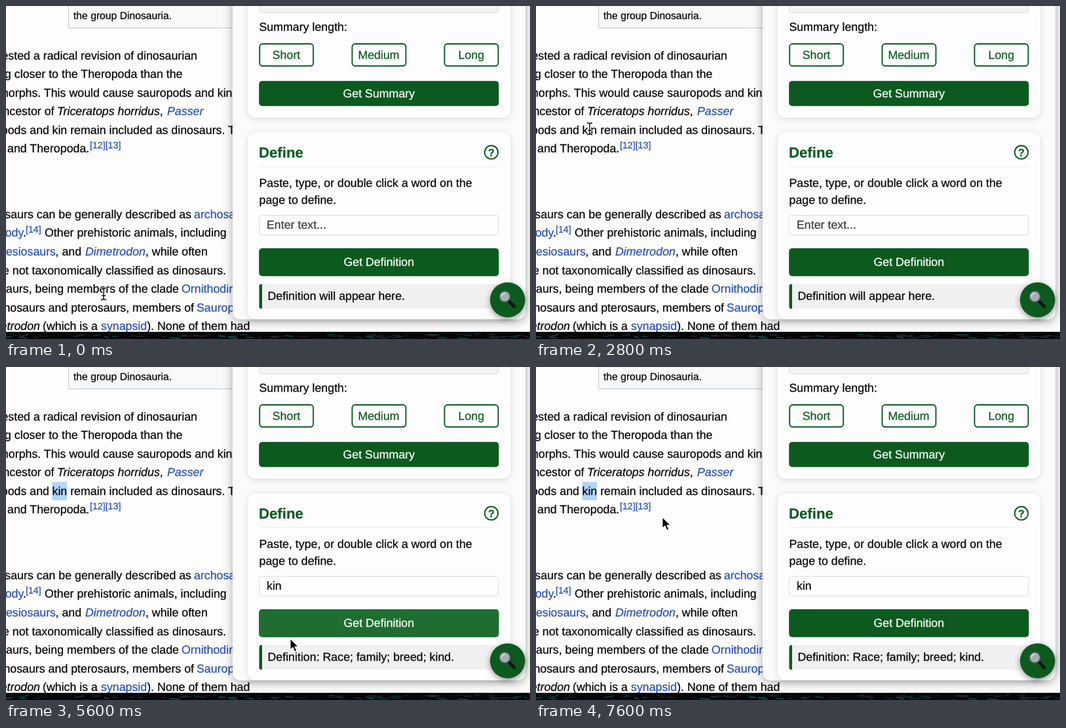
Animation of 800 by 510 pixels, one loop 7.7 s. Source, as an HTML page:

```html
<!DOCTYPE html>
<html lang="en">
<head>
<meta charset="utf-8">
<title>Define a word</title>
<style>
html, body { margin: 0; width: 100%; height: 100%; overflow: hidden; background: #fdfdfe; }
svg { display: block; width: 800px; height: 510px; }
text { --ink: #050505; font: 17.8px "Liberation Sans", Arial, sans-serif; fill: var(--ink);
  stroke: var(--ink); stroke-width: .25px; white-space: pre; text-rendering: geometricPrecision; }
tspan { fill: var(--ink); stroke: var(--ink); }
.end { text-anchor: end; }
.mid { text-anchor: middle; }
.link { --ink: #2950bd; }
.it { font-style: italic; }
.sup { font-size: 14.2px; }
.white { --ink: #fff; }
text.green { --ink: #0d5a1f; }
.green { fill: #0d5a1f; }
.line { fill: none; stroke: #0d5a1f; stroke-width: 1.9; }
.field { stroke: #dcdcde; }
.card { fill: #fdfdff; filter: drop-shadow(0 2px 5px #0002); }
</style>
</head>
<body>
<svg viewBox="0 0 800 510">
  <rect width="800" height="510" fill="#fdfdfe"/>

  <!-- article -->
  <path d="M95.5 -2V33.5H360V-2Z" fill="#f8f9fb" stroke="#c3c7cd"/>
  <text x="103" y="20" style="font-size:15.7px">the group Dinosauria.</text>
  <text class="end" x="292" y="82">ested a radical revision of dinosaurian</text>
  <text class="end" x="269.5" y="110">g closer to the Theropoda than the</text>
  <text class="end" x="345.5" y="139">morphs. This would cause sauropods and kin</text>
  <text class="end" x="73.5" y="167">ancestor of</text>
  <text x="78" y="167"><tspan class="it">Triceratops horridus</tspan>,</text>
  <text class="it link" x="246" y="167">Passer</text>
  <text class="end" x="66" y="196">pods and</text>
  <rect id="mark" x="70.5" y="176" width="22.5" height="28" fill="#b2d6fe"/>
  <text x="70.5" y="196">kin remain included as dinosaurs. T</text>
  <text x="2" y="224">and Theropoda.</text>
  <text class="sup link" x="128" y="218">[12][13]</text>
  <text class="end" x="283" y="325">osaurs can be generally described as</text>
  <text class="link" x="287" y="325">archosaurs</text>
  <text class="end" x="31" y="353"><tspan class="link">body</tspan>.</text>
  <text class="sup link" x="30" y="347">[14]</text>
  <text x="59" y="353">Other prehistoric animals, including</text>
  <text class="end link" x="76" y="382">plesiosaurs</text>
  <text x="75.5" y="382">, and</text>
  <text x="121" y="382"><tspan class="it link">Dimetrodon</tspan>, while often</text>
  <text class="end" x="336" y="411">e not taxonomically classified as dinosaurs.</text>
  <text class="end" x="264" y="439">saurs, being members of the clade</text>
  <text class="link" x="268" y="439">Ornithodira</text>
  <text class="end" x="287" y="468">dinosaurs and pterosaurs, members of</text>
  <text class="link" x="291" y="468">Sauropterygia</text>
  <text class="end it" x="52" y="496">Dimetrodon</text>
  <text x="56" y="496">(which is a</text>
  <text x="145" y="496"><tspan class="link">synapsid</tspan>). None of them had</text>

  <!-- desktop strip -->
  <rect y="499" width="800" height="11" fill="#050608"/>
  <g id="desk" fill="none"></g>

  <!-- side panel -->
  <rect x="346" y="-30" width="447" height="510" rx="12" fill="#fbfbfd" style="filter:drop-shadow(0 3px 8px #0005)"/>
  <rect class="card" x="369" y="-30" width="401" height="201" rx="12"/>
  <rect class="card" x="369" y="193.5" width="401" height="286" rx="12"/>
  <rect class="field" x="386.5" y="-20" width="365.5" height="30.5" rx="4" fill="#f3f3f4"/>
  <text x="386.5" y="38">Summary length:</text>
  <rect class="line" x="387.2" y="58" width="82" height="33.8" rx="4.5"/>
  <rect class="line" x="528.5" y="58" width="82" height="33.8" rx="4.5"/>
  <rect class="line" x="669.5" y="58" width="82" height="33.8" rx="4.5"/>
  <text class="mid green" x="428" y="81">Short</text>
  <text class="mid green" x="569" y="81">Medium</text>
  <text class="mid green" x="710.3" y="81">Long</text>
  <rect class="green" x="386.2" y="114.7" width="366.2" height="38.6" rx="5"/>
  <text class="mid white" x="569.3" y="140">Get Summary</text>

  <text class="green" x="386" y="232" style="font-size:22.2px;font-weight:bold">Define</text>
  <circle class="line" cx="741" cy="224" r="10.2"/>
  <text class="mid green" x="741" y="230" style="font-size:16px;font-weight:bold">?</text>
  <path d="M386.5 246H752" stroke="#ececee"/>
  <text x="386.5" y="277">Paste, type, or double click a word on the</text>
  <text x="386.5" y="303">page to define.</text>
  <rect class="field" x="386.5" y="320.5" width="365.5" height="30.5" rx="4" fill="#fdfdff"/>
  <text id="word" x="398" y="341"></text>
  <rect class="green" x="386.2" y="371" width="366.2" height="42.8" rx="5"/>
  <rect id="hover" x="386.2" y="371" width="366.2" height="42.8" rx="5" fill="#28783a"/>
  <text class="mid white" x="569.3" y="398">Get Definition</text>
  <rect x="386.5" y="426" width="366" height="37.5" rx="4" fill="#f0f0f1"/>
  <path class="green" d="M391 426V463.5H389.5Q386.5 463.5 386.5 460V429.5Q386.5 426 389.5 426Z"/>
  <text id="meaning" x="399.5" y="450"></text>

  <!-- search button -->
  <circle class="green" cx="765.8" cy="450" r="26.8" style="filter:drop-shadow(0 3px 5px #0006)"/>
  <path d="M768 452L776 460.5" stroke="#141618" stroke-width="5" stroke-linecap="round"/>
  <circle cx="761.5" cy="445" r="8.3" fill="#a3aeb2" stroke="#4d5356" stroke-width="1.7"/>
  <path d="M756.5 445A5 5 0 0 1 762 440" fill="none" stroke="#dfe7e9" stroke-width="1.6"/>

  <!-- pointer -->
  <g id="pointer">
    <g id="beam" fill="none" stroke-linecap="round" stroke="#fff" stroke-width="3.2">
      <path id="stem" d="M-3.5 -9Q0 -9 0 -6.5Q0 -9 3.5 -9M0 -6.5V6.5M-3.5 9Q0 9 0 6.5Q0 9 3.5 9M-2.5 2.5H2.5"/>
      <g stroke="#111" stroke-width="1.4"><use href="#stem"/></g>
    </g>
    <path id="arrow" d="M0 0V17L4 13.4L6.8 20L9.9 18.7L7.1 12.3H12.3Z" fill="#000" stroke="#fff" stroke-width="1.1"/>
    <path id="hand" d="M-2 2Q-2 0 0 0Q1.7 0 2 2L3 7Q4.5 5.5 6 7.3Q8 6.3 9 8.3Q11 8 11.3 10.5Q11.5 14.5 9 19.5H0.5Q-1 16.5 -4 14Q-7.5 10.8 -5.5 10Q-3.5 9.6 -.8 12ZM2.6 13V17M5 13V17M7.4 13V17" fill="#fff" stroke="#111" stroke-width="1.2" stroke-linejoin="round"/>
  </g>
</svg>
<script>
const LOOP = 7700, STEP = 100, SELECT = 3100, ANSWER = 3300, LEAVE = 3500;
const $ = id => document.getElementById(id);
const show = (id, on) => $(id).setAttribute("visibility", on ? "visible" : "hidden");

// Tracks hold rows of time followed by values.
const path = [
  [0, 149, 441], [600, 147, 438], [900, 147, 438], [1300, 134, 427],
  [1700, 122, 385], [2300, 92, 235], [2800, 82, 188], [3400, 82, 188],
  [4000, 200, 216], [4600, 311, 224], [4900, 350, 275], [5200, 405, 378],
  [5400, 424, 398], [5600, 434, 416], [5900, 452, 432], [6500, 565, 442],
  [7000, 660, 422], [7100, 667, 409], [7300, 590, 388], [7400, 470, 340],
  [7500, 325, 282], [7600, 193, 230]
];
const glow = [[5200, 0], [5400, 1], [5500, 1], [5600, .65], [5800, 0],
  [7100, 0], [7300, .9], [7400, .6], [7600, 0]];

function at(track, t) {
  const next = track.findIndex(row => row[0] > t);
  if (next < 1) return (next ? track[track.length - 1] : track[0]).slice(1);
  const a = track[next - 1], b = track[next];
  const k = (t - a[0]) / (b[0] - a[0]);
  return a.slice(1).map((v, i) => v + (b[i + 1] - v) * k);
}

// Dim wallpaper strokes along the bottom edge.
let seed = 7;
const rnd = () => (seed = seed * 16807 % 2147483647) / 2147483647;
const tints = ["#12343b", "#17424a", "#2c181e", "#1c2227"];
let strokes = "";
for (let i = 0; i < 80; i++) {
  const x = rnd() * 800, y = 503 + rnd() * 5;
  strokes += `<path d="M${x} ${y}l${4 + rnd() * 12} ${rnd() * 6 - 3}" stroke="${tints[i % 4]}" stroke-width="${1 + rnd()}"/>`;
}
$("desk").innerHTML = strokes;

function draw(now) {
  const t = Math.floor(now % LOOP / STEP) * STEP;
  const [x, y] = at(path, t);
  const picked = t >= SELECT;
  const onButton = x > 386 && x < 752 && y > 371 && y < 414;
  show("mark", picked);
  $("word").textContent = picked ? "kin" : "Enter text...";
  $("word").style.setProperty("--ink", picked ? "#050505" : "#3c3c3e");
  $("meaning").textContent = t >= ANSWER
    ? "Definition: Race; family; breed; kind." : "Definition will appear here.";
  $("hover").setAttribute("opacity", at(glow, t)[0]);
  $("pointer").setAttribute("transform", `translate(${x} ${y})`);
  show("beam", t < LEAVE);
  show("hand", onButton);
  show("arrow", t >= LEAVE && !onButton);
  requestAnimationFrame(draw);
}
requestAnimationFrame(draw);
</script>
</body>
</html>
```
